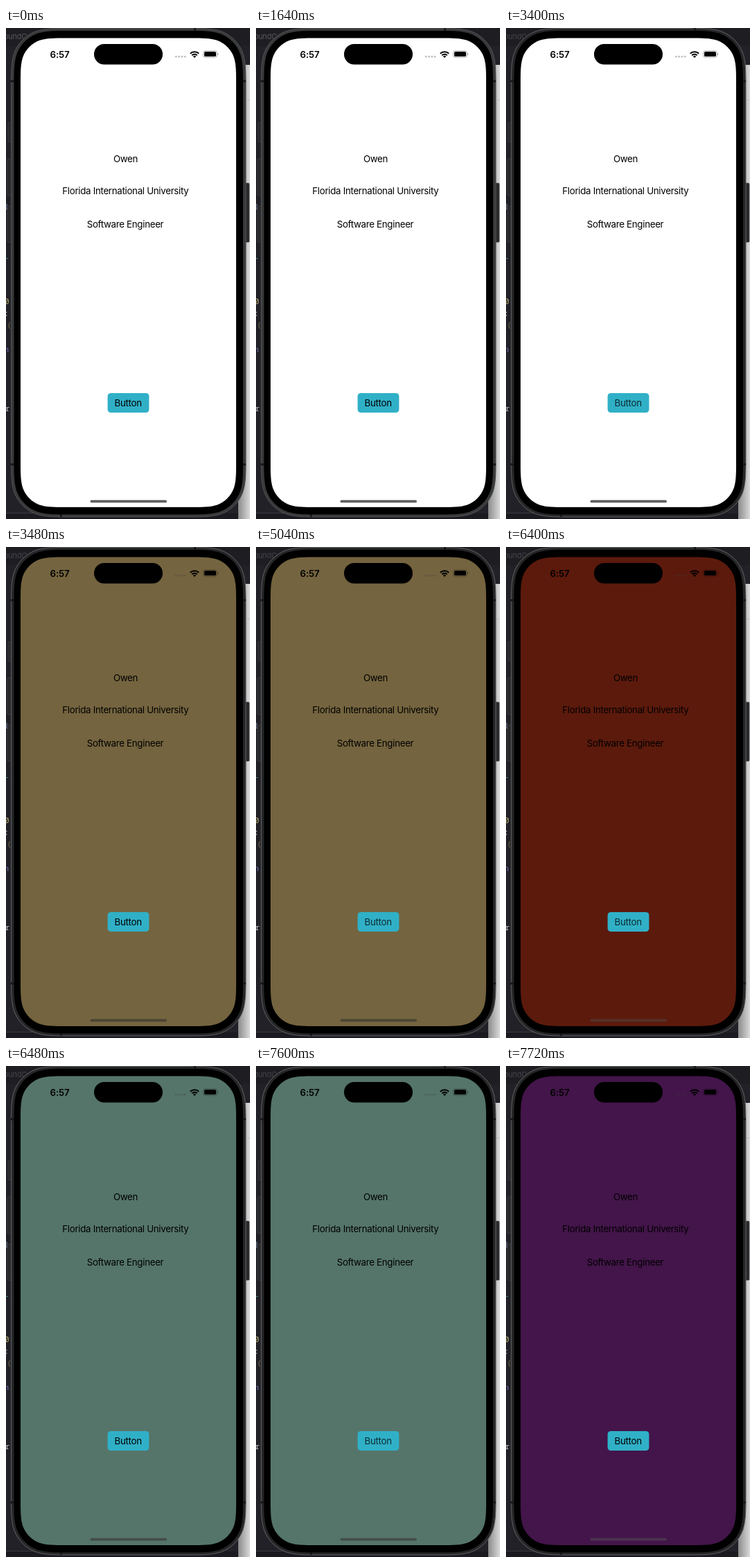
These frames come from a looping animation (352x706 px, 8 s). An HTML page:

```html
<!DOCTYPE html>
<html lang="en">
<head>
<meta charset="utf-8">
<style>
  html, body { margin: 0; width: 100%; height: 100%; overflow: hidden; background: #24232a; }
  svg { display: block; width: 100%; height: 100%; }
  text { font-family: Inter, sans-serif; font-size: 13.3px; letter-spacing: -0.3px; }
  .label { text-anchor: middle; }
  .clock { font-weight: 600; letter-spacing: -0.1px; }
  .code text { font-family: "Noto Sans Mono", monospace; font-size: 11px; letter-spacing: 0; text-anchor: end; }
</style>
</head>
<body>
<svg viewBox="0 0 352 706">
  <defs>
    <linearGradient id="shade">
      <stop offset="0" stop-color="#8c8c8c"/>
      <stop offset="1" stop-color="#dadada"/>
    </linearGradient>
  </defs>

  <!-- Desktop behind the phone -->
  <rect width="352" height="706" fill="#222128"/>
  <rect width="352" height="26" fill="#1e1d22"/>
  <text id="tab" x="-3" y="16" style="font-size:11px">oundC</text>
  <path d="M0 697.5H75" stroke="#3b3a40"/>
  <rect y="698" width="336" height="8" fill="#1b1a20"/>
  <rect x="335" y="53" width="17" height="653" fill="url(#shade)"/>
  <path d="M346 103.5H352" stroke="#bbb"/>
  <g class="code">
    <text x="4" y="261" fill="#6f7f9d">l</text>
    <text x="4" y="334" fill="#4d8795">–</text>
    <text x="4.5" y="397" fill="#b9ae70">0</text>
    <text x="4" y="414" fill="#d0d0d0">:</text>
    <text x="8" y="431" fill="#7a6d4a">(</text>
    <text x="4" y="466" fill="#7672bd">n</text>
    <text x="5" y="551" fill="#c0c0c0">r</text>
  </g>

  <!-- Phone body -->
  <g fill="#29292b" stroke="#454547" stroke-width=".6">
    <rect x="3" y="136" width="6" height="28" rx="1.5"/>
    <rect x="2" y="188" width="7" height="53" rx="1.5"/>
    <rect x="2" y="256" width="7" height="52" rx="1.5"/>
    <rect x="344" y="223" width="7" height="85" rx="1.5"/>
  </g>
  <path id="body"/>
  <path d="M7 76.5h5M7 627.5h5M341 76.5h5M341 627.5h5M272.5 0v4M79.5 699v4" stroke="#18191a" stroke-width="3"/>
  <path id="bezel"/>

  <!-- Screen -->
  <path id="screen"/>
  <rect x="127" y="23" width="99" height="29.5" rx="14.75"/>
  <text class="clock" x="63.5" y="42.5">6:57</text>
  <g fill="#3c3c43" opacity=".32">
    <circle cx="245.3" cy="41.2" r="1.4"/><circle cx="249.6" cy="41.2" r="1.4"/>
    <circle cx="253.9" cy="41.2" r="1.4"/><circle cx="258.2" cy="41.2" r="1.4"/>
  </g>
  <g fill="none" stroke="#000" stroke-width="2">
    <path d="M265.8 36.8a8.8 8.8 0 0 1 12.4 0"/>
    <path d="M268.2 39.2a5.4 5.4 0 0 1 7.6 0"/>
  </g>
  <path d="M272 43l-2.2-2.3a3.2 3.2 0 0 1 4.4 0z"/>
  <rect x="284.6" y="32.8" width="19.8" height="9.6" rx="3" fill="none" stroke="#000" stroke-opacity=".38" stroke-width=".8"/>
  <rect x="286" y="34.1" width="17" height="7" rx="1.9"/>
  <path d="M305.4 36v3.2q1.2-.5 1.2-1.6t-1.2-1.6z" opacity=".4"/>

  <text class="label" x="172.5" y="193">Owen</text>
  <text class="label" x="172.4" y="238.8">Florida International University</text>
  <text class="label" x="172" y="286.8">Software Engineer</text>
  <rect x="146.6" y="525" width="59.8" height="28" rx="4.6" fill="#30b0c7"/>
  <text class="label" id="caption" x="176.2" y="543.8">Button</text>
  <rect id="homeBar" x="121.5" y="678.8" width="110.5" height="3.8" rx="1.9"/>
</svg>
<script>
  const LOOP = 8000;
  const FOCUS_AT = 2400;
  // Each press changes the background when it is released.
  const themes = [
    { at: 0, screen: "#ffffff", bar: "#606060" },
    { press: 3400, at: 3480, screen: "#74643f", bar: "#4c4435" },
    { press: 5040, at: 5160, screen: "#5c1a0c", bar: "#56302a" },
    { press: 6400, at: 6480, screen: "#55756a", bar: "#434d49" },
    { press: 7600, at: 7720, screen: "#43154a", bar: "#4b344e" }
  ];
  const byId = id => document.getElementById(id);
  const set = (id, attrs) => {
    for (const name in attrs) byId(id).setAttribute(name, attrs[name]);
  };

  // Rectangle with continuous-curvature corners, wider than plain arcs.
  function smoothRect(left, top, right, bottom, r) {
    const corner = [[1.529, 0], [1.088, 0], [0.868, 0], [0.631, 0.075],
      [0.373, 0.169], [0.169, 0.373], [0.075, 0.631], [0, 0.868], [0, 1.088], [0, 1.529]];
    const place = (points, x, y, sx, sy) =>
      points.map(([u, v]) => `${x + sx * u * r} ${y + sy * v * r}`);
    const back = [...corner].reverse();
    return [
      place(corner, left, top, 1, 1),
      place(back, left, bottom, 1, -1),
      place(corner, right, bottom, -1, -1),
      place(back, right, top, -1, 1)
    ].map(([first, ...rest], i) => `${i ? "L" : "M"}${first}C${rest.join(" ")}`).join("") + "Z";
  }

  set("body", { d: smoothRect(7.5, 0.5, 346, 703, 56.5) });
  set("bezel", { d: smoothRect(11.5, 4, 342, 699.5, 53) });
  set("screen", { d: smoothRect(21, 14.5, 332, 689, 43.5) });

  function draw(t) {
    const theme = themes.filter(c => c.at <= t).pop();
    const pressed = themes.some(c => t >= c.press && t < c.at);
    const focused = t >= FOCUS_AT;
    set("screen", { fill: theme.screen });
    set("homeBar", { fill: theme.bar });
    set("caption", { "fill-opacity": pressed ? 0.75 : 1 });
    set("body", { fill: focused ? "#252627" : "#38393a", stroke: focused ? "#626364" : "#525354" });
    set("tab", { fill: focused ? "#444349" : "#57565b" });
  }

  const start = performance.now();
  function tick() {
    draw((performance.now() - start) % LOOP);
    requestAnimationFrame(tick);
  }
  tick();
</script>
</body>
</html>
```
